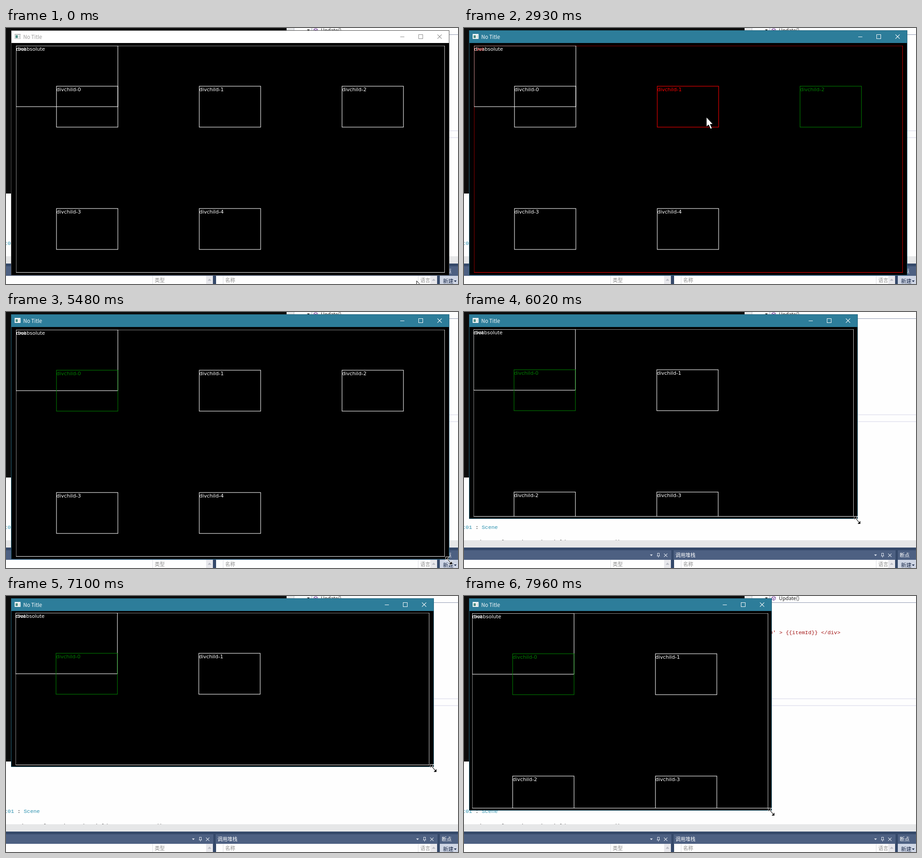
These frames come from a looping animation (994 by 563 pixels, 8 s). An HTML page with a canvas:

```html
<!DOCTYPE html>
<html lang="en">
<head>
<meta charset="utf-8">
<title>Flex layout</title>
<style>
html, body { margin: 0; width: 100%; height: 100%; overflow: hidden; background: #fff; }
canvas { display: block; }
</style>
</head>
<body>
<canvas id="stage" width="994" height="563"></canvas>
<script>
const c = document.getElementById('stage').getContext('2d');
const LOOP = 8000, STEP = 76;
const ACTIVE_AT = 445, GRIP_AT = 5400, DRAG_AT = 5780;
const UI = '"Noto Sans CJK SC", "Noto Sans CJK", "Noto Sans", sans-serif';
const LABEL = '11px "DejaVu Sans", sans-serif';
const CODE = '11.8px "Liberation Mono", monospace';
const GREY = '#8c8c8c', NAVY = '#35496a';

const linear = p => p;
const easeOut = p => 1 - (1 - p) ** 2.6;

// The pointer is sampled once per STEP, so it moves in small hops
function mouseAt(t) {
  let x = 903, y = 556;
  function glide(from, to, tx, ty, ease = linear) {
    if (t < from) return;
    const hops = Math.round((to - from) / STEP) + 1;
    const done = t >= to ? hops : Math.floor((t - from) / (to - from) * (hops - 1)) + 1;
    const p = ease(done / hops);
    x += (tx - x) * p;
    y += (ty - y) * p;
  }
  glide(70, 820, 236, 151);
  glide(900, 1590, 533, 196, easeOut);
  glide(4170, 4170, 563, 205);
  glide(4250, 4400, 946, 246);
  glide(4550, 5480, 974, 547);
  glide(DRAG_AT, 6020, 865, 458);
  glide(6400, 7100, 940, 379);
  glide(7500, 7960, 676, 475);
  return [Math.round(x), Math.round(y)];
}

function focusAt(t) {
  return t < 2290 ? -1 : t < 2460 ? 0 : t < 2780 ? 3 : t < 2930 ? 4 : t < 3620 ? 2 : 0;
}

function rect(x, y, w, h, color) {
  c.fillStyle = color;
  c.fillRect(x, y, w, h);
}

function text(s, x, y, color, font) {
  c.font = font;
  c.fillStyle = color;
  c.fillText(s, x, y);
}

function ui(s, x, y, color, size = 11) {
  text(s, x, y, color, size + 'px ' + UI);
}

function line(x1, y1, x2, y2, color, width = 1) {
  c.strokeStyle = color;
  c.lineWidth = width;
  c.beginPath();
  c.moveTo(x1, y1);
  c.lineTo(x2, y2);
  c.stroke();
}

// Isosceles triangle: w wide, h high; negative h points up
function caret(x, y, color, w = 6, h = 3.5) {
  c.fillStyle = color;
  c.beginPath();
  c.moveTo(x - w / 2, y - h / 2);
  c.lineTo(x + w / 2, y - h / 2);
  c.lineTo(x, y + h / 2);
  c.fill();
}

function cross(x, y, r, color) {
  line(x - r, y - r, x + r, y + r, color, 1.1);
  line(x - r, y + r, x + r, y - r, color, 1.1);
}

function cube(x, y, r, color) {
  c.strokeStyle = color;
  c.lineWidth = 1;
  c.beginPath();
  for (let i = 0; i < 6; i++) {
    const a = Math.PI * (i / 3 + 1 / 6);
    c.lineTo(x + r * Math.cos(a), y + r * Math.sin(a));
  }
  c.closePath();
  c.stroke();
  for (let i = 0; i < 3; i++) {
    const a = Math.PI * (i * 2 / 3 + 1 / 2);
    line(x, y, x + r * Math.cos(a), y + r * Math.sin(a), color);
  }
}

function panel(title, x, w, columns) {
  const right = x + w, ink = '#dfe4ee';
  rect(x, 524, w, 21, '#4d6082');
  rect(x, 545, w - 1, 18, '#fefefe');
  ui(title, x + 4, 539, '#fff');
  for (const [name, cx] of columns) {
    rect(cx - 5, 545, 1, 18, '#dcdde2');
    ui(name, cx, 559, GREY);
  }
  rect(right - 16, 545, 15, 18, '#e8e8ec');
  caret(right - 8.5, 553.5, '#b9bbc4', 8, -4.5);
  caret(right - 44, 535, ink);
  c.strokeStyle = ink;
  c.lineWidth = 1;
  c.strokeRect(right - 30.5, 530.5, 4, 6);
  line(right - 32, 536.5, right - 25, 536.5, ink);
  line(right - 28.5, 537, right - 28.5, 540, ink);
  cross(right - 12.5, 535, 3.7, ink);
}

function drawEditor() {
  rect(0, 0, 994, 563, '#fefefe');
  rect(0, 0, 617, 364, '#0c0c0c');
  rect(617, 0, 16, 14, '#e6e7e8');
  rect(633, 0, 1, 14, '#b5b9c6');
  caret(665, 5, '#1e1e1e');
  rect(671, 0, 3, 14, '#d5d8e2');
  cube(681, 5, 4.5, '#652d90');
  ui('Update()', 692.5, 9, '#1e1e1e');
  rect(617, 14, 377, 1, '#8e97b0');
  for (const y of [225, 240]) rect(617, y, 377, 2, '#e8e8f2');

  text("0' > {{itemId}} </div>", 672, 84, '#a31515', CODE);
  text('t01   Scene', -3.5, 477, '#2b91af', CODE);
  text(':', 25, 477, '#111', CODE);
  text('internal static EntityField new SceneItem ()', 33, 509, '#333', CODE);

  rect(0, 502, 994, 16, '#e6e7e8');
  rect(0, 518, 994, 45, NAVY);
  panel('', 0, 456, [['类型', 327]]);
  panel('调用堆栈', 461, 488, [['名称', 482], ['语言', 911]]);
  rect(461, 545, 1, 18, NAVY);
  rect(954, 524, 40, 21, '#4d6082');
  rect(954, 545, 40, 18, '#cfd6e5');
  ui('断点', 958, 539, '#fff');
  ui('新建', 961, 561, '#1b2a4a', 11.5);
  caret(988, 557, '#1b2a4a');
}

// right and bottom are the inner limits; a 1px outline lies around the title bar
function drawFrame(right, bottom, active) {
  const ink = active ? '#fff' : GREY;
  rect(11, 5, right - 10, bottom - 4, active ? '#23657d' : '#4a4a4a');
  rect(12, 6, right - 12, 27, active ? '#2d7d9a' : '#fff');
  rect(12, 33, right - 12, bottom - 33, '#000');

  rect(19, 13, 13, 11, active ? '#e9f0f2' : '#b4b8b8');
  rect(20, 15, 11, 8, '#fff');
  rect(21, 16, 5, 6, '#4f8f86');
  rect(28, 16, 2, 6, '#c3cccc');
  ui('No Title', 38, 23.5, active ? '#fff' : '#999', 11.3);

  line(right - 107, 19.5, right - 98, 19.5, ink);
  c.strokeRect(right - 66.5, 14.5, 9, 9);
  cross(right - 20.5, 19, 4.7, ink);
}

function box(x, y, w, h, color, label) {
  c.strokeStyle = color;
  c.lineWidth = 1.1;
  c.strokeRect(x, y, w, h);
  text(label, x, y + 11, color, LABEL);
}

function drawLayout(right, bottom, mx, my, focus) {
  const w = right - 12, h = bottom - 33;
  const x = Math.round(11.3 + 0.0108 * w), y = 34 + Math.floor(0.01 * h);
  const rw = Math.floor(0.98 * w) + 1, rh = Math.floor(bottom - 0.01 * h) + 1 - y;
  const over = (l, t, bw, bh) => mx >= l && mx <= l + bw && my >= t && my <= t + bh;
  const rootColor = over(x, y, rw, rh) ? '#f00' : '#fff';

  c.save();
  c.beginPath();
  c.rect(x, y, rw, rh);
  c.clip();
  box(x, y, rw + 9, rh + 9, rootColor, 'root');
  c.globalAlpha = 0.8;
  rect(x + rw - 1, y, 1, rh, rootColor);
  c.globalAlpha = 1;
  rect(x, y + rh - 1, rw, 1, rootColor);

  box(x, y, 224, 134, '#fff', 'divabsolute');
  const cols = Math.max(1, Math.floor(rw / 313.6));
  for (let i = 0; i < 5; i++) {
    const cx = x + 89 + 314 * (i % cols), cy = y + 89 + 269 * Math.floor(i / cols);
    const hover = over(cx, cy, 139, 94);
    box(cx, cy, 135, 90, hover ? '#f00' : i === focus ? '#008000' : '#fff', 'divchild-' + i);
  }
  c.restore();
}

function drawArrow(x, y) {
  const shape = new Path2D('M0 0V21L5 17L9 26L12.5 24.5L8.5 15.8L14.5 15.5Z');
  c.save();
  c.translate(x, y);
  c.fillStyle = '#fff';
  c.strokeStyle = '#000';
  c.lineWidth = 1;
  c.fill(shape);
  c.stroke(shape);
  c.restore();
}

// Diagonal resize pointer: one half, then the same half turned around
function drawGrip(x, y) {
  const half = new Path2D('M0 0L-4 -5M-6 -7.5H-2L-6 -3Z');
  c.save();
  c.translate(x, y);
  for (const [color, width] of [['#fff', 3], ['#000', 1.2]]) {
    c.strokeStyle = c.fillStyle = color;
    c.lineWidth = width;
    for (let i = 0; i < 2; i++) {
      c.stroke(half);
      c.fill(half);
      c.rotate(Math.PI);
    }
  }
  c.restore();
}

function draw(t) {
  const [mx, my] = mouseAt(t);
  const drag = t >= DRAG_AT;
  const right = drag ? mx : 974, bottom = drag ? my - 4 : 543;
  drawEditor();
  drawFrame(right, bottom, t >= ACTIVE_AT);
  drawLayout(right, bottom, mx, my, focusAt(t));
  (t >= GRIP_AT ? drawGrip : drawArrow)(mx, my);
}

const begin = performance.now();
function tick() {
  draw((performance.now() - begin) % LOOP);
  requestAnimationFrame(tick);
}
tick();
</script>
</body>
</html>
```
